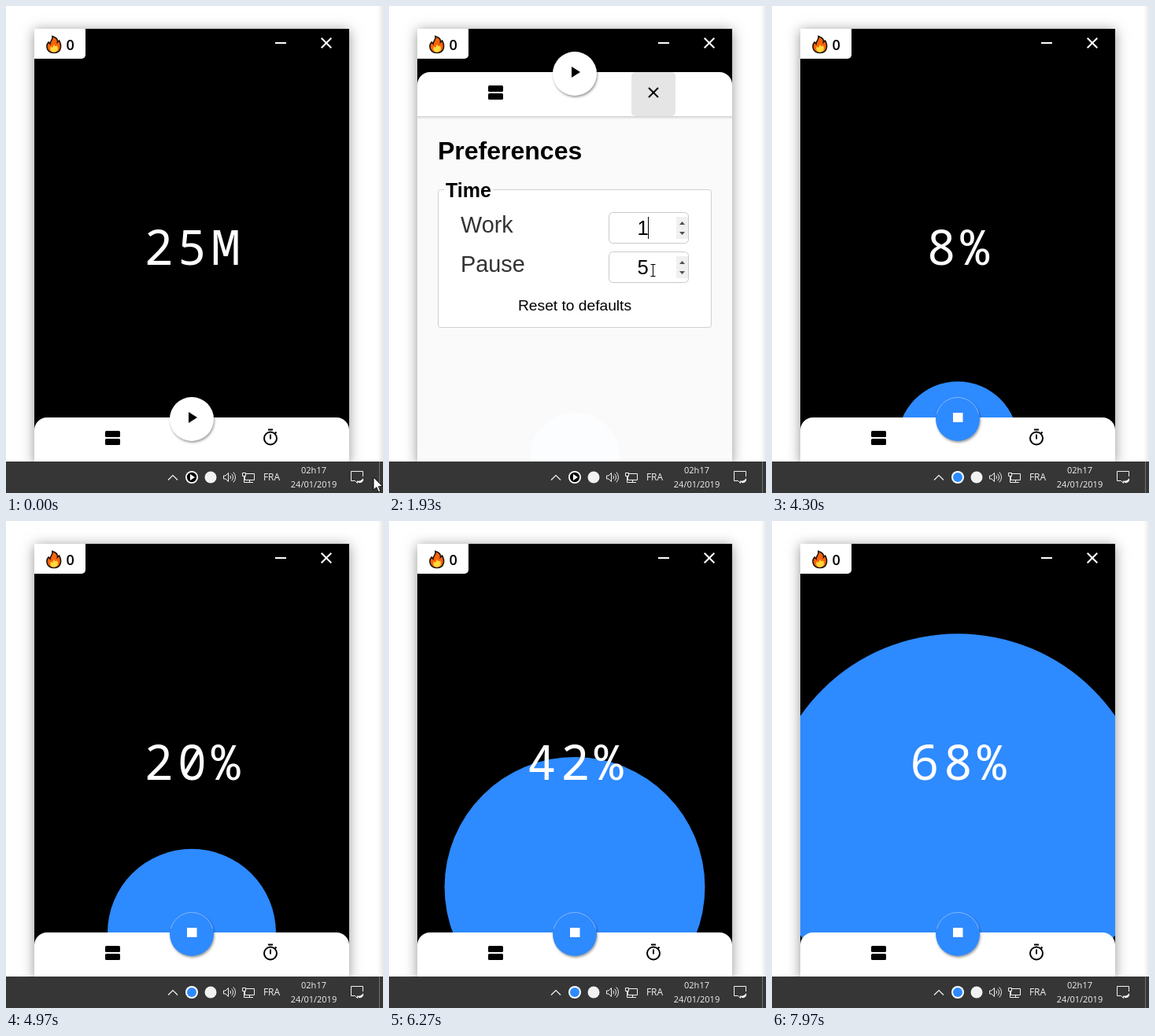
An HTML page with a canvas for the animation above (8 s loop, 479 by 619 pixels).

```html
<!DOCTYPE html>
<html lang="en">
<head>
<meta charset="utf-8">
<title>Work timer</title>
<style>
html, body { margin: 0; width: 100%; height: 100%; overflow: hidden; background: #fff; }
canvas { display: block; width: 479px; height: 619px; }
</style>
</head>
<body>
<canvas id="stage" width="479" height="619"></canvas>
<script>
const ctx = document.getElementById('stage').getContext('2d');
const LOOP = 8000;
const BLUE = '#2e8aff';
const SANS = '"Liberation Sans", Arial, sans-serif';
const UI = '"Open Sans", "Noto Sans", sans-serif';
const MONO = '"Noto Sans Mono", "DejaVu Sans Mono", monospace';

// Moments of the scene, in ms
const OPEN = 630, CLOSE = 3050, SLIDE = 500;
const SELECT = 1400, TYPED = 1680;
const START = 3725, SECOND = 101.5;
const BAR_LOW = 523, BAR_HIGH = 84;

// Pointer path: time, x, y
const PATH = [
  [0, 467, 599], [30, 467, 599], [330, 364, 488], [470, 364, 488],
  [590, 340, 550], [680, 340, 550], [1130, 337, 288], [1270, 336, 284],
  [1400, 336, 284], [1560, 281, 284], [1700, 281, 284], [1900, 335, 336],
  [2170, 335, 336], [2400, 320, 341], [2600, 264, 298], [2880, 300, 192],
  [2970, 322, 166], [3040, 336, 112], [3090, 336, 114], [3300, 288, 231],
  [3620, 240, 528], [3830, 240, 528]
];

const clamp = v => Math.max(0, Math.min(1, v));
const mix = (a, b, k) => a + (b - a) * k;

// cubic-bezier(.25, .1, .25, 1)
function ease(x) {
  if (x <= 0) return 0;
  if (x >= 1) return 1;
  let lo = 0, hi = 1;
  const at = (s, p, q) => 3 * s * (1 - s) ** 2 * p + 3 * s * s * (1 - s) * q + s ** 3;
  for (let i = 0; i < 18; i++) {
    const mid = (lo + hi) / 2;
    if (at(mid, 0.25, 0.25) < x) lo = mid; else hi = mid;
  }
  return at(lo, 0.1, 1);
}

function rect(x, y, w, h, fill, radius = 0, border) {
  ctx.beginPath();
  ctx.roundRect(x, y, w, h, radius);
  if (fill) { ctx.fillStyle = fill; ctx.fill(); }
  if (border) { ctx.strokeStyle = border; ctx.lineWidth = 1; ctx.stroke(); }
}

function disc(x, y, r, fill) {
  ctx.beginPath();
  ctx.arc(x, y, r, 0, Math.PI * 2);
  ctx.fillStyle = fill;
  ctx.fill();
}

function ring(x, y, r, color, width) {
  ctx.beginPath();
  ctx.arc(x, y, r, 0, Math.PI * 2);
  ctx.strokeStyle = color;
  ctx.lineWidth = width;
  ctx.stroke();
}

// Each line is a flat list of x, y pairs
function strokes(color, width, ...lines) {
  ctx.strokeStyle = color;
  ctx.lineWidth = width;
  ctx.beginPath();
  for (const p of lines) {
    ctx.moveTo(p[0], p[1]);
    for (let i = 2; i < p.length; i += 2) ctx.lineTo(p[i], p[i + 1]);
  }
  ctx.stroke();
}

function poly(fill, ...p) {
  ctx.beginPath();
  for (let i = 0; i < p.length; i += 2) ctx.lineTo(p[i], p[i + 1]);
  ctx.closePath();
  ctx.fillStyle = fill;
  ctx.fill();
}

function text(str, x, y, font, color, align = 'left') {
  ctx.font = font;
  ctx.fillStyle = color;
  ctx.textAlign = align;
  ctx.fillText(str, x, y);
}

function cross(x, y, r, color) {
  strokes(color, 2, [x - r, y - r, x + r, y + r], [x + r, y - r, x - r, y + r]);
}

function withShadow(color, blur, dx, dy, draw) {
  ctx.save();
  ctx.shadowColor = color;
  ctx.shadowBlur = blur;
  ctx.shadowOffsetX = dx;
  ctx.shadowOffsetY = dy;
  draw();
  ctx.restore();
}

function backdrop() {
  rect(0, 0, 479, 619, '#fff');
  const edge = ctx.createLinearGradient(472, 0, 479, 0);
  edge.addColorStop(0, '#fff');
  edge.addColorStop(1, '#e9e9e9');
  rect(472, 0, 7, 579, edge);
  withShadow('rgba(0,0,0,.42)', 15, 0, 2, () => rect(36, 29, 400, 552, '#000'));
}

function flame() {
  ctx.beginPath();
  ctx.moveTo(59, 38.5);
  ctx.bezierCurveTo(64, 40, 66, 43, 65.5, 46);
  ctx.lineTo(67.5, 44);
  ctx.bezierCurveTo(71, 50, 70.5, 59.5, 61, 59.5);
  ctx.bezierCurveTo(51, 59.5, 50.5, 50, 54, 46);
  ctx.lineTo(56, 48);
  ctx.bezierCurveTo(56, 44, 60, 43, 59, 38.5);
  ctx.closePath();
  ctx.fillStyle = '#f8640c';
  ctx.fill();
  ctx.strokeStyle = '#1d1208';
  ctx.lineWidth = 1.6;
  ctx.stroke();
  ctx.beginPath();
  ctx.moveTo(61, 48.5);
  ctx.bezierCurveTo(62, 52, 64, 51, 65, 50.5);
  ctx.bezierCurveTo(67.5, 55, 65, 58.7, 61, 58.7);
  ctx.bezierCurveTo(56, 58.7, 55.5, 54, 57, 51.5);
  ctx.lineTo(59, 53);
  ctx.closePath();
  ctx.fillStyle = '#ffd93b';
  ctx.fill();
}

function header() {
  rect(36, 29, 65, 38, '#fff', [0, 0, 5, 0]);
  flame();
  text('0', 81.7, 56, '600 18px ' + UI, '#000', 'center');
  rect(342, 46, 14, 2, '#fff');
  cross(407, 47, 6.3, '#fff');
}

function growth(t) {
  const u = (t - START) / SECOND;
  if (u < 0) return 57;
  const s = Math.floor(u) + ease(u % 1);
  return Math.max(57, 49.3 + 4.632 * s);
}

function label(t) {
  if (t < START) return t < TYPED ? '25M' : '1M';
  const seconds = Math.floor((t - START) / SECOND);
  return Math.round(seconds / 60 * 100) + '%';
}

function bigLabel(str) {
  const pitch = 42.6;
  [...str].forEach((c, i) => {
    const x = 236.5 + (i - (str.length - 1) / 2) * pitch;
    text(c, x, 328.5, '300 61.5px ' + MONO, '#fff', 'center');
  });
}

function numberField(y, value, selected, caret) {
  rect(279.5, y + 0.5, 101, 39, '#fff', 5, '#c9c9c9');
  if (selected > 0) rect(mix(337, 308, selected), y + 5, 29 * selected, 30, '#3390ff');
  text(value, 322.5, y + 29, '25.6px ' + SANS, selected === 1 ? '#fff' : '#000', 'center');
  if (caret) rect(329, y + 6, 1, 28, '#000');
  rect(365, y + 6, 15, 28, '#f0f0f0');
  poly('#505050', 369, y + 16, 372.5, y + 12, 376, y + 16);
  poly('#505050', 369, y + 25, 372.5, y + 29, 376, y + 25);
}

function preferences(t, y) {
  ctx.save();
  ctx.translate(0, y - BAR_HIGH);
  text('Preferences', 62, 195, 'bold 32px ' + SANS, '#000');
  rect(62.5, 233.5, 347, 175, '#fff', 3, '#d0d0d4');
  rect(70, 233, 62, 1, '#fafafa');
  text('Time', 72, 243, 'bold 25px ' + SANS, '#000');
  text('Work', 91, 288, '28.8px ' + SANS, '#333');
  text('Pause', 91, 338, '28.8px ' + SANS, '#333');
  const selected = t < TYPED ? clamp((t - SELECT) / 140) : 0;
  const caret = t >= TYPED && (t - TYPED) % 1000 < 500;
  numberField(262, t < TYPED ? '25' : '1', selected, caret);
  numberField(312, '5', 0, false);
  text('Reset to defaults', 236, 387, '19.2px ' + SANS, '#000', 'center');
  ctx.restore();
}

function stopwatch(x, y) {
  ring(x, y, 8, '#000', 2);
  strokes('#000', 2, [x - 3, y - 11, x + 3, y - 11], [x, y - 5, x, y + 1], [x + 5.5, y - 6, x + 7.5, y - 8]);
}

function bar(t, y) {
  const open = t >= OPEN && t < CLOSE;
  if (y < BAR_LOW) {
    rect(36, y + 56, 400, 579 - y, 'rgba(255,255,255,.98)');
    if (open) preferences(t, y);
    const shade = ctx.createLinearGradient(0, y + 56, 0, y + 60);
    shade.addColorStop(0, 'rgba(0,0,0,.16)');
    shade.addColorStop(1, 'rgba(0,0,0,0)');
    rect(36, y + 56, 400, 4, shade);
  }
  rect(36, y, 400, 56, '#fff', [16, 16, 0, 0]);
  const hover = clamp((t - 560) / 100) * (1 - clamp((t - 3110) / 230));
  if (hover > 0) rect(308, y, 56, 56, `rgba(0,0,0,${0.1 * hover})`, 5);
  rect(126, y + 17, 19, 8, '#000', 1.5);
  rect(126, y + 27, 19, 8, '#000', 1.5);
  if (open) cross(336, y + 26, 6, '#000');
  else stopwatch(336, y + 26.5);

  const running = t >= START;
  withShadow('rgba(0,0,0,.38)', 3, 1, 2, () => disc(236, y + 2, 28, running ? BLUE : '#fff'));
  if (running) {
    ctx.beginPath();
    ctx.arc(236, y + 2, 27.5, Math.PI * 1.08, Math.PI * 1.92);
    ctx.strokeStyle = 'rgba(255,255,255,.4)';
    ctx.lineWidth = 1;
    ctx.stroke();
    rect(230, y - 6, 12.5, 12, '#fff');
  } else {
    poly('#000', 232, y - 7, 243, y, 232, y + 7);
  }
}

function appWindow(t) {
  ctx.save();
  ctx.beginPath();
  ctx.rect(36, 29, 400, 550);
  ctx.clip();
  const r = growth(t);
  disc(236, 630.8 - r, r, BLUE);
  bigLabel(label(t));
  header();
  const shown = ease((t - OPEN) / SLIDE) - ease((t - CLOSE) / SLIDE);
  bar(t, mix(BAR_LOW, BAR_HIGH, shown));
  ctx.restore();
}

function taskbar(t) {
  const white = '#f2f2f2';
  rect(0, 579, 479, 40, '#363636');
  rect(474, 579, 1, 40, '#707070');
  strokes(white, 1.2, [206, 602.5, 212, 596.5, 218, 602.5]);

  disc(236, 599, 8, '#fff');
  if (t < START + 30) {
    disc(236, 599, 6.2, '#000');
    poly('#fff', 234, 595, 240, 599, 234, 603);
  } else {
    disc(236, 599, 6, BLUE);
  }
  disc(260, 599, 7.5, white);

  // Volume
  strokes(white, 1, [276.5, 597, 279, 597, 282.5, 593.5, 282.5, 604.5, 279, 601, 276.5, 601, 276.5, 597]);
  for (const r of [3, 6, 9]) {
    ctx.beginPath();
    ctx.arc(282.5, 599, r, -0.8, 0.8);
    ctx.stroke();
  }
  // Network
  rect(303.5, 594.5, 12, 8, null, 0, white);
  strokes(white, 1, [309.5, 603, 309.5, 605.5], [305, 605.5, 314, 605.5]);
  rect(300.5, 593.5, 4, 4, '#363636', 0, white);
  strokes(white, 1, [302.5, 598, 302.5, 605.5, 305, 605.5]);

  text('FRA', 337.5, 603, '12px ' + UI, white, 'center');
  text('02h17', 391, 594, '11px ' + UI, white, 'center');
  text('24/01/2019', 391, 612, '11px ' + UI, white, 'center');

  // Notification bubble with a small moon
  if (t > START + 40 && t < START + 180) rect(438, 591, 16, 12, white);
  strokes(white, 1, [453.5, 598, 453.5, 591.5, 438.5, 591.5, 438.5, 603.5, 443.5, 603.5, 446.5, 606.5, 446.5, 603.5]);
  ctx.beginPath();
  ctx.arc(450, 602, 4, -0.5, 2.7);
  ctx.quadraticCurveTo(452, 604, 453.5, 600);
  ctx.fillStyle = white;
  ctx.fill();
}

function pointer(t) {
  const next = PATH.findIndex(p => p[0] > t);
  if (next < 1) return;
  const [t0, x0, y0] = PATH[next - 1], [t1, x1, y1] = PATH[next];
  const k = clamp((t - t0) / (t1 - t0));
  const x = mix(x0, x1, k), y = mix(y0, y1, k);
  const inField = t > 1100 && t < CLOSE && x > 279 && x < 365 &&
    ((y > 262 && y < 302) || (y > 312 && y < 352));
  ctx.save();
  ctx.translate(Math.round(x), Math.round(y));
  if (inField) {
    strokes('#000', 1, [0.5, -7, 0.5, 7], [-2.5, -7.5, 3.5, -7.5], [-2.5, 7.5, 3.5, 7.5]);
  } else {
    poly('#fff', 0, 0, 0, 16, 3.7, 12.7, 6.3, 18.5, 8.8, 17.4, 6.3, 11.8, 11.3, 11.5);
    ctx.strokeStyle = '#000';
    ctx.lineWidth = 0.9;
    ctx.stroke();
  }
  ctx.restore();
}

function frame() {
  const t = performance.now() % LOOP;
  backdrop();
  appWindow(t);
  taskbar(t);
  pointer(t);
  requestAnimationFrame(frame);
}
frame();
</script>
</body>
</html>
```
